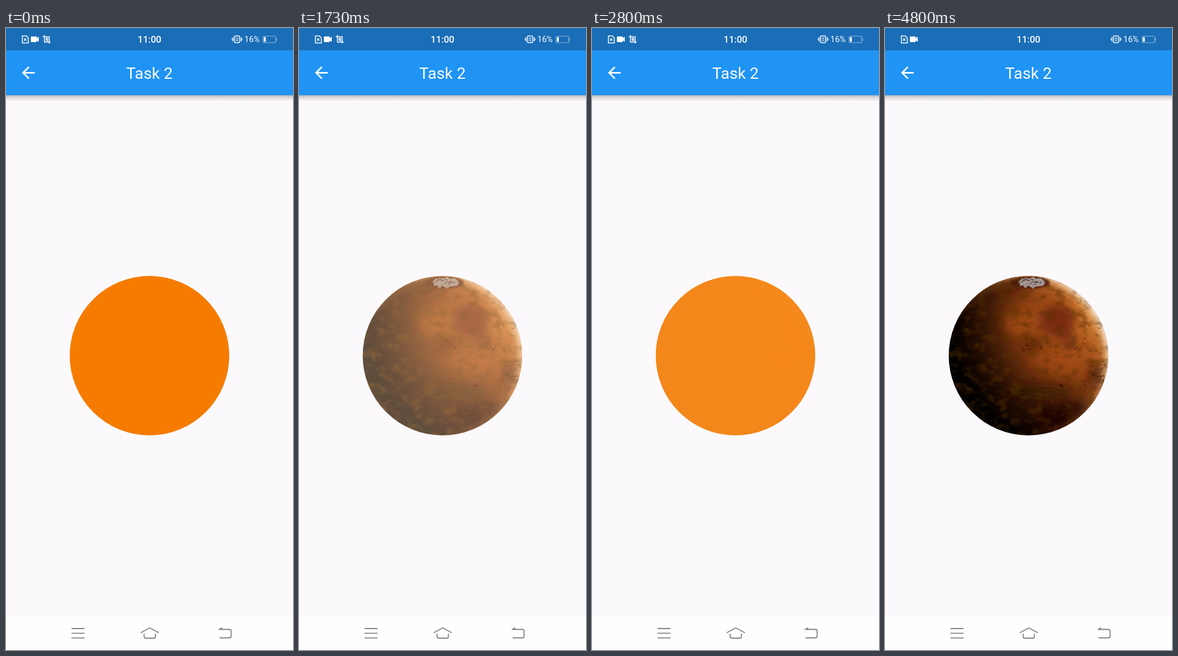
An HTML page that plays this animation: 508 px wide and 1102 px high, repeating every 4990 ms.

```html
<!DOCTYPE html>
<html lang="en">
<head>
<meta charset="utf-8">
<title>Task 2</title>
<style>
  html, body { margin: 0; width: 100%; height: 100%; overflow: hidden; background: #fbf9fc; }
  svg { display: block; width: 100%; height: 100%; }
  text { font-family: Roboto, sans-serif; fill: #fff; }
  .line { fill: none; stroke: #fff; stroke-width: 1.5; }
  .nav { fill: none; stroke: #858084; stroke-width: 1.8; }
  .disc { fill: #f57c00; }
  #planet { will-change: opacity; }
</style>
</head>
<body>
<svg viewBox="0 0 508 1102">
  <defs>
    <linearGradient id="shadow" x2="0" y2="1">
      <stop offset="0" stop-opacity=".34"/>
      <stop offset=".4" stop-opacity=".13"/>
      <stop offset="1" stop-opacity="0"/>
    </linearGradient>
    <radialGradient id="shade" gradientUnits="userSpaceOnUse" cx="365" cy="508" r="265">
      <stop offset="0" stop-color="#c9772f"/>
      <stop offset=".2" stop-color="#b15a1d"/>
      <stop offset=".42" stop-color="#8f4113"/>
      <stop offset=".56" stop-color="#672d0c"/>
      <stop offset=".7" stop-color="#371605"/>
      <stop offset=".83" stop-color="#180702"/>
      <stop offset=".94" stop-color="#010000"/>
    </radialGradient>
    <radialGradient id="rim" gradientUnits="userSpaceOnUse" cx="236" cy="593" r="163">
      <stop offset=".78" stop-color="#e09048" stop-opacity="0"/>
      <stop offset=".88" stop-color="#e39a55" stop-opacity=".22"/>
      <stop offset=".94" stop-color="#efb87e" stop-opacity=".65"/>
      <stop offset="1" stop-color="#f6e9dc" stop-opacity=".96"/>
    </radialGradient>
    <filter id="soft" x="-50%" y="-50%" width="200%" height="200%"><feGaussianBlur stdDeviation="8"/></filter>
    <filter id="fuzzy" x="-30%" y="-30%" width="160%" height="160%"><feGaussianBlur stdDeviation="1.6"/></filter>
    <filter id="grain" x="0" y="0" width="100%" height="100%">
      <feTurbulence type="fractalNoise" baseFrequency=".05 .07" numOctaves="5" seed="8"/>
      <feColorMatrix values="0 0 0 0 .1  0 0 0 0 .03  0 0 0 0 0  3.2 0 0 0 -1.45"/>
    </filter>
    <filter id="rough" x="-20%" y="-30%" width="140%" height="160%">
      <feTurbulence type="fractalNoise" baseFrequency=".12" numOctaves="3" seed="4"/>
      <feDisplacementMap in="SourceGraphic" scale="9" xChannelSelector="R" yChannelSelector="G"/>
    </filter>
    <clipPath id="globe"><circle cx="254" cy="580.5" r="141.2"/></clipPath>
  </defs>

  <rect width="508" height="1102" fill="#fbf9fc"/>
  <rect y="118" width="508" height="12" fill="url(#shadow)"/>
  <rect width="508" height="119" fill="#2094f4"/>
  <rect width="508" height="39.5" fill="#1a6eb7"/>
  <rect y="1042" width="508" height="60" fill="#fefdff"/>

  <!-- status bar -->
  <g class="line">
    <path d="M29 14h7l3.500 3.500v9h-10.500zM32 18.500l4 4m0-4l-4 4"/>
    <g id="crop">
      <path d="M68 12.500v12.500h11M65 15.500h11.500v12"/>
      <path d="M74.500 18h-3.500v2.200h3v2.300h-3.500"/>
    </g>
    <rect x="404.500" y="14" width="9" height="12" rx="1.500"/>
    <path d="M407 17.500h4m-4 2.500h4m-4 2.500h4M402 16v8M416 16v8M400.300 18v4M417.700 18v4" stroke-width="1.200"/>
    <rect x="455" y="14.500" width="22.500" height="11.500" rx="2" stroke="#8fb9df" stroke-width="1.100"/>
    <path d="M479 18v4.500" stroke="#8fb9df" stroke-width="1.200"/>
  </g>
  <path d="M45 15h8.500q1 0 1 1v2l3.500-2.500v9l-3.500-2.500v2q0 1-1 1h-8.500q-1 0-1-1v-8q0-1 1-1z" fill="#fff"/>
  <rect x="456.500" y="16" width="3.300" height="8.500" rx="1" fill="#fff"/>
  <text x="254" y="26" font-size="16.500" font-weight="500" text-anchor="middle">11:00</text>
  <text x="422" y="25.200" font-size="14.500">16%</text>

  <!-- app bar -->
  <path transform="translate(22.600 62.400) scale(1.411)" fill="#fff"
    d="M20 11H7.830l5.590-5.590L12 4l-8 8 8 8 1.410-1.410L7.830 13H20z"/>
  <text x="254" y="90" font-size="28.200" text-anchor="middle">Task 2</text>

  <!-- cross-fading pair -->
  <circle id="discUnder" class="disc" cx="254" cy="580.5" r="141.2"/>
  <g id="planet" clip-path="url(#globe)">
    <rect x="112" y="438" width="284" height="285" fill="url(#shade)"/>
    <g filter="url(#soft)">
      <ellipse cx="240" cy="522" rx="28" ry="25" fill="#a64d16" opacity=".7"/>
      <ellipse cx="305" cy="518" rx="32" ry="30" fill="#73270c" opacity=".85"/>
      <ellipse cx="325" cy="555" rx="18" ry="16" fill="#70280c" opacity=".6"/>
      <ellipse cx="300" cy="590" rx="42" ry="17" fill="#a94d17" opacity=".55"/>
      <ellipse cx="262" cy="560" rx="17" ry="12" fill="#4c1b09" opacity=".7"/>
      <ellipse cx="377" cy="617" rx="15" ry="22" fill="#35150a" opacity=".75"/>
      <ellipse cx="275" cy="645" rx="60" ry="14" fill="#2c0f05" opacity=".55"/>
      <ellipse cx="325" cy="692" rx="65" ry="28" fill="#170501" opacity=".75"/>
      <ellipse cx="218" cy="452" rx="28" ry="12" fill="#3a1508" opacity=".8"/>
    </g>
    <rect x="112" y="438" width="284" height="285" fill="url(#rim)"/>
    <rect x="112" y="438" width="284" height="285" filter="url(#grain)" opacity=".5"/>
    <g id="cracks" fill="none" stroke="#260c04" filter="url(#rough)"></g>
    <ellipse cx="257" cy="451" rx="35" ry="11" fill="#4d1d0c" opacity=".8" filter="url(#fuzzy)"/>
    <g filter="url(#rough)">
      <ellipse cx="259" cy="451" rx="24" ry="8" fill="#a29694"/>
      <path d="M238 452q12-9 25-4m-14 8q12-9 28-4m-17 6l7-9" fill="none" stroke="#51362e"/>
    </g>
  </g>
  <circle id="discOver" class="disc" cx="254" cy="580.5" r="141.2"/>
  <circle id="touch" cx="266" cy="573" r="13" fill="#fff" opacity=".77"/>

  <!-- navigation bar -->
  <g class="nav">
    <path d="M116 1064h23m-23 8.300h23m-23 8.300h23"/>
    <path d="M238.500 1071.500l15-8.300q1-.5 2 0l15 8.300M244.500 1073v5q0 3 3 3h14q3 0 3-3v-5"/>
    <path d="M377 1065.500h18.500q3 0 3 3v9q0 3-3 3h-17.500"/>
    <path d="M375.500 1066l7-4.500v4.500z" fill="#858084" stroke="none"/>
  </g>
</svg>
<script>
  const LOOP = 4990, FRAME = 1000 / 15, FADE = 540;
  const fades = [
    { start: 1397, toPlanet: true },
    { start: 2320, toPlanet: false },
    { start: 3260, toPlanet: true }
  ];
  const touches = [[1260, 1520], [2260, 2400], [3130, 3330]];
  const CROP_HIDDEN_AT = 4720;

  const byId = id => document.getElementById(id);
  const setOpacity = (id, value) => byId(id).setAttribute('opacity', value);

  let seed = 29;
  const random = () => (seed = seed * 16807 % 2147483647) / 2147483647;

  function addCracks(count, cx, cy, rx, ry) {
    let d = '';
    for (let i = 0; i < count; i++) {
      const x = cx + (random() * 2 - 1) * rx, y = cy + (random() * 2 - 1) * ry;
      d += `M${x} ${y}q${random() * 6} ${random() * 8 - 4} ${random() * 10 - 2} ${random() * 6 - 3}`;
    }
    const path = document.createElementNS('http://www.w3.org/2000/svg', 'path');
    path.setAttribute('d', d);
    path.setAttribute('opacity', .55);
    byId('cracks').append(path);
  }
  addCracks(16, 258, 558, 18, 14);
  addCracks(38, 275, 637, 85, 20);
  addCracks(24, 376, 612, 13, 22);
  addCracks(18, 352, 525, 30, 50);
  addCracks(14, 255, 456, 35, 7);

  function draw(time) {
    const fade = fades.filter(f => time >= f.start).pop();
    const progress = fade ? Math.min(1, (time - fade.start) / FADE) : 1;
    const toPlanet = !!fade && fade.toPlanet;
    // The incoming picture always lies on top of the outgoing one.
    setOpacity('discUnder', toPlanet ? 1 - progress : 0);
    setOpacity('planet', !fade ? 0 : toPlanet ? progress : 1 - progress);
    setOpacity('discOver', toPlanet ? 0 : progress);
    setOpacity('touch', touches.some(([a, b]) => time >= a && time < b) ? .77 : 0);
    setOpacity('crop', time < CROP_HIDDEN_AT ? 1 : 0);
  }

  const origin = performance.now();
  function tick() {
    const time = (performance.now() - origin) % LOOP;
    draw(Math.floor((time + 4) / FRAME) * FRAME);
    requestAnimationFrame(tick);
  }
  tick();
</script>
</body>
</html>
```
